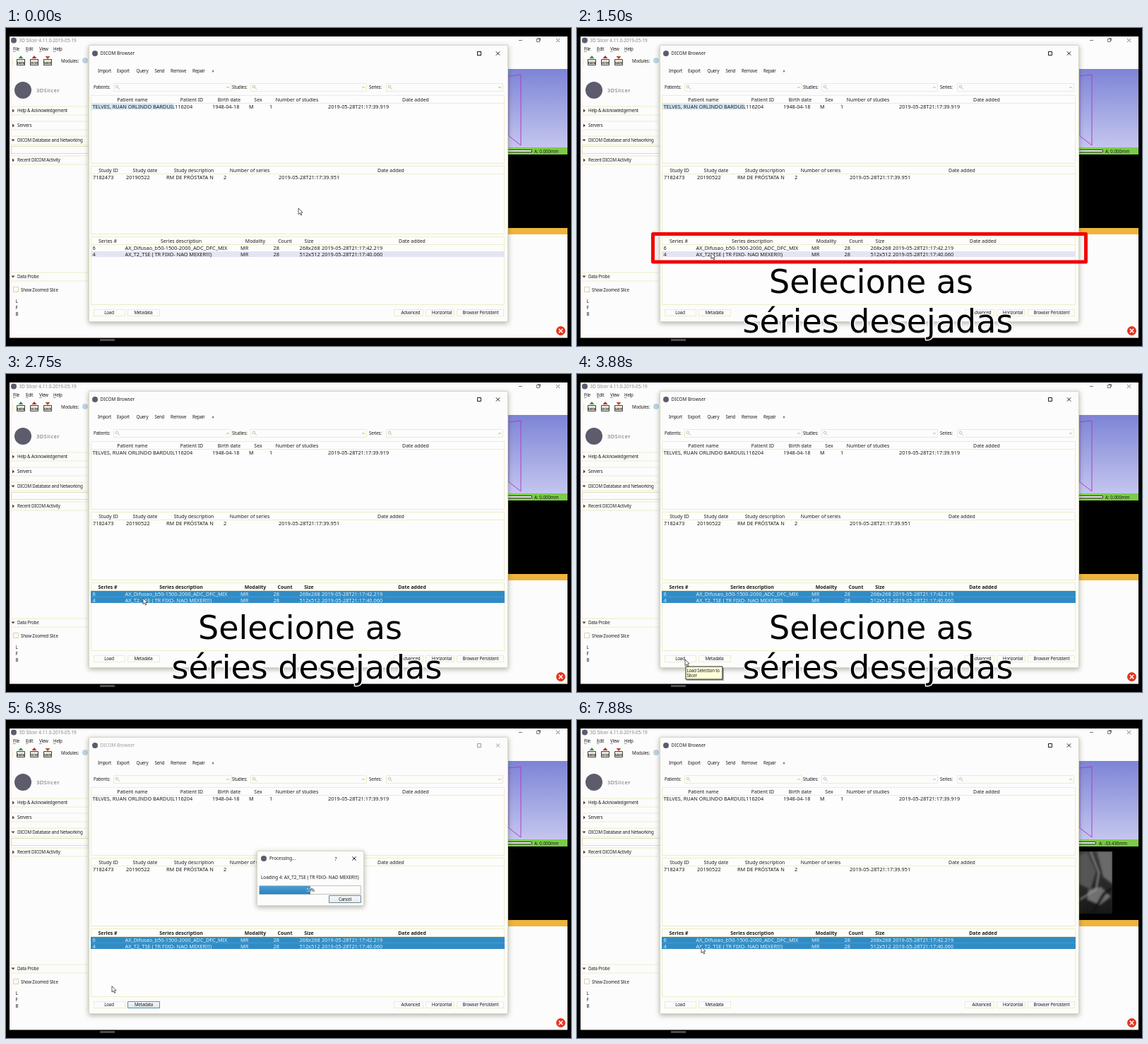
Recreate the animation shown at these times as an HTML page with a canvas. Size 800 by 450 pixels, loop 8000 ms.

```html
<!DOCTYPE html>
<html lang="pt">
<head>
<meta charset="utf-8">
<title>DICOM Browser</title>
<style>
  html, body { margin: 0; width: 100%; height: 100%; overflow: hidden; background: #000; }
  canvas { display: block; width: 800px; height: 450px; }
</style>
</head>
<body>
<canvas id="stage"></canvas>
<script>
const LOOP = 8000, STEP = 125;
const SANS = '"Noto Sans", "Open Sans", sans-serif';
const LINE = '#eeedc6', PAPER = '#fcfcfc', INK = '#1c1c1c', BLUE = '#308cc6';

// Times at which the state changes
const CAPTION_IN = 500, CAPTION_OUT = 6250;
const FRAME_IN = 500, FRAME_OUT = 2250;
const SELECT = 2375, TIP_IN = 3750;
const BUSY_IN = 6375, BUSY_OUT = 7750;

const pointerPath = [
  [0, 414, 255], [125, 414, 255], [875, 190, 318], [2250, 190, 318],
  [2500, 194, 317], [3300, 194, 317], [3800, 153, 404], [6125, 153, 404],
  [6625, 147, 349], [7250, 147, 349], [7750, 176, 321]
];

const canvas = document.getElementById('stage');
const ratio = window.devicePixelRatio || 1;
canvas.width = 800 * ratio;
canvas.height = 450 * ratio;
const ctx = canvas.getContext('2d');

const between = (t, a, b) => t >= a && t < b;

function rect(x, y, w, h, fill) {
  ctx.fillStyle = fill;
  ctx.fillRect(x, y, w, h);
}

function box(x, y, w, h, stroke = LINE, width = 1) {
  ctx.strokeStyle = stroke;
  ctx.lineWidth = width;
  ctx.strokeRect(x, y, w, h);
}

function line(points, stroke, width = 1) {
  ctx.beginPath();
  points.forEach(([x, y]) => ctx.lineTo(x, y));
  ctx.strokeStyle = stroke;
  ctx.lineWidth = width;
  ctx.stroke();
}

function disc(x, y, r, fill) {
  ctx.beginPath();
  ctx.arc(x, y, r, 0, 7);
  ctx.fillStyle = fill;
  ctx.fill();
}

function shape(points, fill) {
  ctx.beginPath();
  points.forEach(([x, y]) => ctx.lineTo(x, y));
  ctx.closePath();
  ctx.fillStyle = fill;
  ctx.fill();
}

function gradient(y0, y1, from, to) {
  const g = ctx.createLinearGradient(0, y0, 0, y1);
  g.addColorStop(0, from);
  g.addColorStop(1, to);
  return g;
}

// y is the middle of the capitals
function text(s, x, y, { size = 6.2, gap = 0, color = INK, align = 'left', weight = 400 } = {}) {
  ctx.font = `${weight} ${size}px ${SANS}`;
  ctx.letterSpacing = gap + 'px';
  ctx.textAlign = align;
  ctx.fillStyle = color;
  ctx.fillText(s, x, y + size * 0.36);
  ctx.letterSpacing = '0px';
}

const label = (s, x, y, opts) => text(s, x, y, { gap: -0.2, ...opts });
const cell = (s, x, y, color = INK) => text(s, x, y, { size: 7.35, color });
const cells = (row, y, color) => row.forEach(([s, x]) => cell(s, x, y, color));

function cross(x, y, r, color, width = 1) {
  line([[x - r, y - r], [x + r, y + r]], color, width);
  line([[x - r, y + r], [x + r, y - r]], color, width);
}

function panel(x, y, w, h) {
  ctx.save();
  ctx.shadowColor = 'rgba(60,60,40,.4)';
  ctx.shadowBlur = 7 * ratio;
  ctx.shadowOffsetY = 2 * ratio;
  rect(x, y, w, h, PAPER);
  ctx.restore();
  box(x + 0.5, y + 0.5, w - 1, h - 1, '#d8d8bc');
}

function fold(s, y, open) {
  line([[7, y - 6], [115, y - 6]], LINE);
  line([[7, y + 6], [115, y + 6]], LINE);
  shape(open ? [[7.5, y - 1.5], [12.5, y - 1.5], [10, y + 1.5]]
             : [[9, y - 2.5], [12, y], [9, y + 2.5]], '#444');
  label(s, 16, y);
}

function toolIcon(x, s, arrow, up) {
  rect(x - 6, 44, 12, 9, '#e9e6da');
  box(x - 5.5, 44.5, 11, 8, '#444');
  text(s, x, 49, { size: 4.2, align: 'center', weight: 700, color: '#222' });
  const tip = up ? 39 : 44, base = up ? 43 : 40;
  shape([[x - 3.5, base], [x + 3.5, base], [x, tip]], arrow);
}

function sliceViews(loaded) {
  rect(711, 58, 84, 111, gradient(58, 169, '#7d84d6', '#c4c6ee'));
  const violet = '#b03ad0';
  line([[711, 68], [729, 66], [729, 166], [711, 152]], violet);
  line([[712, 68], [712, 152]], '#8f6cd8');

  rect(711, 169, 84, 10, '#7bcb48');
  const end = loaded ? 735 : 745;
  rect(711, 172, end - 711, 4, '#f4f4f4');
  box(710.5, 172.5, end - 711, 3, '#333');
  text(loaded ? 'A: -33.436mm' : 'A: 0.000mm', loaded ? 739 : 748, 174.3, { size: 6.2 });

  rect(711, 179, 84, 104, '#000');
  if (loaded) scan();
  rect(711, 283, 84, 9, '#efb43c');
}

// Soft grey tones standing in for the scanned slice
function scan() {
  ctx.save();
  ctx.beginPath();
  ctx.rect(711, 186, 47, 88);
  ctx.clip();
  rect(711, 186, 47, 88, gradient(186, 274, '#3c3c3c', '#171717'));
  ctx.filter = 'blur(1.5px)';
  shape([[736, 186], [758, 186], [758, 232], [745, 222]], '#6a6a6a');
  shape([[711, 192], [722, 186], [735, 214], [727, 240], [711, 232]], '#555');
  shape([[724, 240], [742, 236], [756, 250], [740, 262], [722, 254]], '#707070');
  line([[727, 186], [739, 216], [735, 240], [712, 254]], '#999', 2);
  line([[758, 238], [746, 246], [730, 274]], '#111', 3);
  ctx.restore();
}

function mainWindow(loaded) {
  rect(0, 0, 800, 450, '#000');
  rect(133, 440, 21, 3, '#4c4c4c');
  rect(5, 12, 790, 426.5, PAPER);

  disc(11, 17.5, 4, '#5c5c6c');
  text('3D Slicer 4.11.0-2019-05-19', 18.5, 17.5, { size: 6.4, color: '#858585' });
  line([[726, 17.5], [731, 17.5]], '#777');
  box(751.5, 15.5, 4, 4, '#777');
  line([[753, 14.5], [756.5, 14.5], [756.5, 18]], '#777');
  cross(781.5, 17.5, 2.5, '#777');

  [['File', 10], ['Edit', 28], ['View', 47], ['Help', 67]].forEach(([s, x]) => {
    label(s, x, 30);
    line([[x, 33.5], [x + 3.5, 33.5]], '#555', 0.6);
  });
  line([[9.5, 42], [9.5, 54]], LINE);
  toolIcon(21, 'DATA', '#3d8f4a', true);
  toolIcon(40, 'DCM', '#b03434', true);
  toolIcon(59, 'SAVE', '#b54a2c', false);
  label('Modules:', 78, 46.5);
  disc(112, 46, 4, '#bcd4e4');

  disc(24, 88, 12, '#5c5c6c');
  text('3DSlicer', 43, 88, { size: 7.4, gap: 0.6, color: '#666' });

  fold('Help & Acknowledgement', 117, false);
  fold('Servers', 138, false);
  fold('DICOM Database and Networking', 159, true);
  box(7.5, 167.5, 110, 10, '#deddc0');
  fold('Recent DICOM Activity', 187, false);
  fold('Data Probe', 352, true);
  box(10.5, 366.5, 7, 7, '#d5d4ae');
  label('Show Zoomed Slice', 21, 370.5);
  ['L', 'F', 'B'].forEach((s, i) => label(s, 13.5, 387 + i * 9));

  sliceViews(loaded);
  disc(785.5, 428.5, 6.5, '#e3341f');
  cross(785.5, 428.5, 2.7, '#fff', 1.6);
}

function table(y, heads, bold) {
  rect(120, y, 586, 97, '#fdfdfd');
  box(120.5, y + 0.5, 585, 96, LINE);
  line([[120, y + 11.5], [706, y + 11.5]], LINE);
  heads.forEach(([s, x]) =>
    text(s, x, y + 6, { size: 6.95, align: 'center', weight: bold ? 700 : 400 }));
}

function search(s, x, from, to) {
  label(s, x, 84);
  box(from + 0.5, 78.5, to - from, 11, LINE);
  ctx.beginPath();
  ctx.arc(from + 5, 83, 1.8, 0, 7);
  ctx.strokeStyle = '#a9b6bd';
  ctx.lineWidth = 0.8;
  ctx.stroke();
  line([[from + 6.4, 84.4], [from + 9, 87]], '#a9b6bd', 0.8);
  line([[to - 6, 85], [to - 4, 83], [to - 2, 85]], '#999', 0.7);
}

function button(s, x, w, mid = x + w / 2) {
  box(x + 0.5, 398.5, w, 9, LINE);
  label(s, mid, 403, { align: 'center' });
}

function browser(t) {
  const picked = t >= SELECT, busy = between(t, BUSY_IN, BUSY_OUT);
  const titleInk = busy ? '#9a9a9a' : INK;
  panel(117, 24, 594, 392);
  disc(126, 36, 4, '#5c5c6c');
  text('DICOM Browser', 133.5, 36, { size: 6.5, color: titleInk });
  box(667.5, 33.5, 5, 5, titleInk);
  cross(696.5, 36, 2.6, titleInk);

  [['Import', 130], ['Export', 157], ['Query', 184.5], ['Send', 210.5],
   ['Remove', 233], ['Repair', 264], ['»', 291.5]].forEach(([s, x]) => label(s, x, 61));

  search('Patients:', 124, 152, 318);
  search('Studies:', 320, 346, 510);
  search('Series:', 514, 538, 703);

  table(95, [['Patient name', 179], ['Patient ID', 263], ['Birth date', 316], ['Sex', 357],
    ['Number of studies', 412], ['Date added', 580]]);
  if (!picked) rect(121, 107, 116, 8.5, '#d3e6f2');
  cells([['TELVES, RUAN ORLINDO BARDUIL', 122.5], ['116204', 239], ['1948-04-18', 292],
    ['M', 344], ['1', 373], ['2019-05-28T21:17:39.919', 456]], 111.3);

  table(195, [['Study ID', 145], ['Study date', 197], ['Study description', 266],
    ['Number of series', 345], ['Date added', 545]]);
  cells([['7182473', 123], ['20190522', 170], ['RM DE PRÓSTATA N', 227],
    ['2', 308], ['2019-05-28T21:17:39.951', 386]], 211);

  table(295, [['Series #', 144], ['Series description', 248], ['Modality', 353],
    ['Count', 395], ['Size', 429], ['Date added', 575]], picked);
  if (picked) {
    rect(120, 307, 586, 17, BLUE);
    rect(120, 315.3, 586, 0.5, '#5ba6d6');
  } else {
    rect(121, 316, 585, 8, '#e4e4f2');
  }
  const rowInk = picked ? '#e2f1fa' : INK;
  const series = (n, name, size, date, y) => cells([[n, 122.5], [name, 168.5], ['MR', 332],
    ['28', 378.5], [`${size}x${size}`, 415.5], ['2019-05-28T21:17:' + date, 447]], y, rowInk);
  series('6', 'AX_Difusao_b50-1500-2000_ADC_DFC_MIX', 268, '42.219', 311.2);
  series('4', 'AX_T2_TSE ( TR FIXO- NAO MEXER!!!)', 512, '40.060', 320);

  if (busy) {
    rect(172, 398, 46, 10, gradient(398, 408, '#fafafa', '#d8e4ec'));
    box(172.5, 398.5, 45, 9, '#5f8fae');
    label('Metadata', 195, 403, { align: 'center' });
  } else {
    button('Metadata', 172, 45);
  }
  button('Load', 124, 44);
  button('Advanced', 549, 41, 573);
  button('Horizontal', 594, 40, 617);
  button('Browser Persistent', 638, 66, 672);
}

function processing() {
  panel(355, 185, 152, 78);
  disc(365, 196, 4, '#5c5c6c');
  text('Processing...', 373, 196, { size: 6.3 });
  text('?', 467, 196, { size: 7, align: 'center' });
  cross(493, 196, 2.6, INK);
  text('Loading 4: AX_T2_TSE ( TR FIXO- NAO MEXER!!!)', 361, 223, { size: 6.35 });

  box(358.5, 234.5, 144, 12, '#bfc4b8');
  rect(359, 235, 72, 11.5, gradient(235, 247, '#4a9fd4', '#2a80bb'));
  const percent = color => label('50%', 431, 240.5, { align: 'center', color });
  percent(INK);
  ctx.save();
  ctx.beginPath();
  ctx.rect(359, 235, 72, 12);
  ctx.clip();
  percent('#fff');
  ctx.restore();

  rect(457, 248, 46, 11, gradient(248, 259, '#fafafa', '#e4e8ea'));
  box(457.5, 248.5, 45, 10, '#6d8797');
  label('Cancel', 480, 253.5, { align: 'center' });
}

function caption() {
  ctx.font = '46px "DejaVu Sans", sans-serif';
  ctx.textAlign = 'left';
  ctx.lineJoin = 'round';
  ctx.lineWidth = 3;
  ctx.strokeStyle = PAPER;
  ctx.fillStyle = '#000';
  [['Selecione as', 272, 375], ['séries desejadas', 234.5, 431]].forEach(([s, x, y]) => {
    ctx.strokeText(s, x, y);
    ctx.fillText(s, x, y);
  });
}

function tooltip() {
  rect(155, 416, 53, 18, 'rgba(60,60,40,.4)');
  rect(153.5, 413.5, 52, 18.5, '#ffffdc');
  box(154, 414, 52, 18, '#222');
  label('Load Selection to', 155.5, 419.3);
  label('Slicer', 155.5, 427);
}

function pointer(t) {
  let i = pointerPath.findIndex(p => p[0] > t);
  if (i < 0) i = pointerPath.length;
  const a = pointerPath[i - 1], b = pointerPath[i] || a;
  const k = b === a ? 0 : (t - a[0]) / (b[0] - a[0]);
  ctx.save();
  ctx.translate(a[1] + (b[1] - a[1]) * k, a[2] + (b[2] - a[2]) * k);
  const arrow = [[0, 0], [0, 8.6], [2, 6.8], [3.5, 10], [4.9, 9.3], [3.5, 6.3], [6, 6]];
  shape(arrow, '#fff');
  line([...arrow, [0, 0]], '#333', 0.8);
  ctx.restore();
}

function draw(now) {
  const t = Math.floor((now % LOOP) / STEP) * STEP;
  ctx.setTransform(ratio, 0, 0, ratio, 0, 0);
  mainWindow(t >= BUSY_OUT);
  browser(t);
  if (between(t, FRAME_IN, FRAME_OUT)) box(107.5, 291.5, 613, 39.5, '#f20606', 5);
  if (between(t, CAPTION_IN, CAPTION_OUT)) caption();
  if (between(t, TIP_IN, CAPTION_OUT)) tooltip();
  if (between(t, BUSY_IN, BUSY_OUT)) processing();
  pointer(t);
}

let start;
function tick(now) {
  start ??= now;
  draw(now - start);
  requestAnimationFrame(tick);
}
draw(0);
requestAnimationFrame(tick);
</script>
</body>
</html>
```
